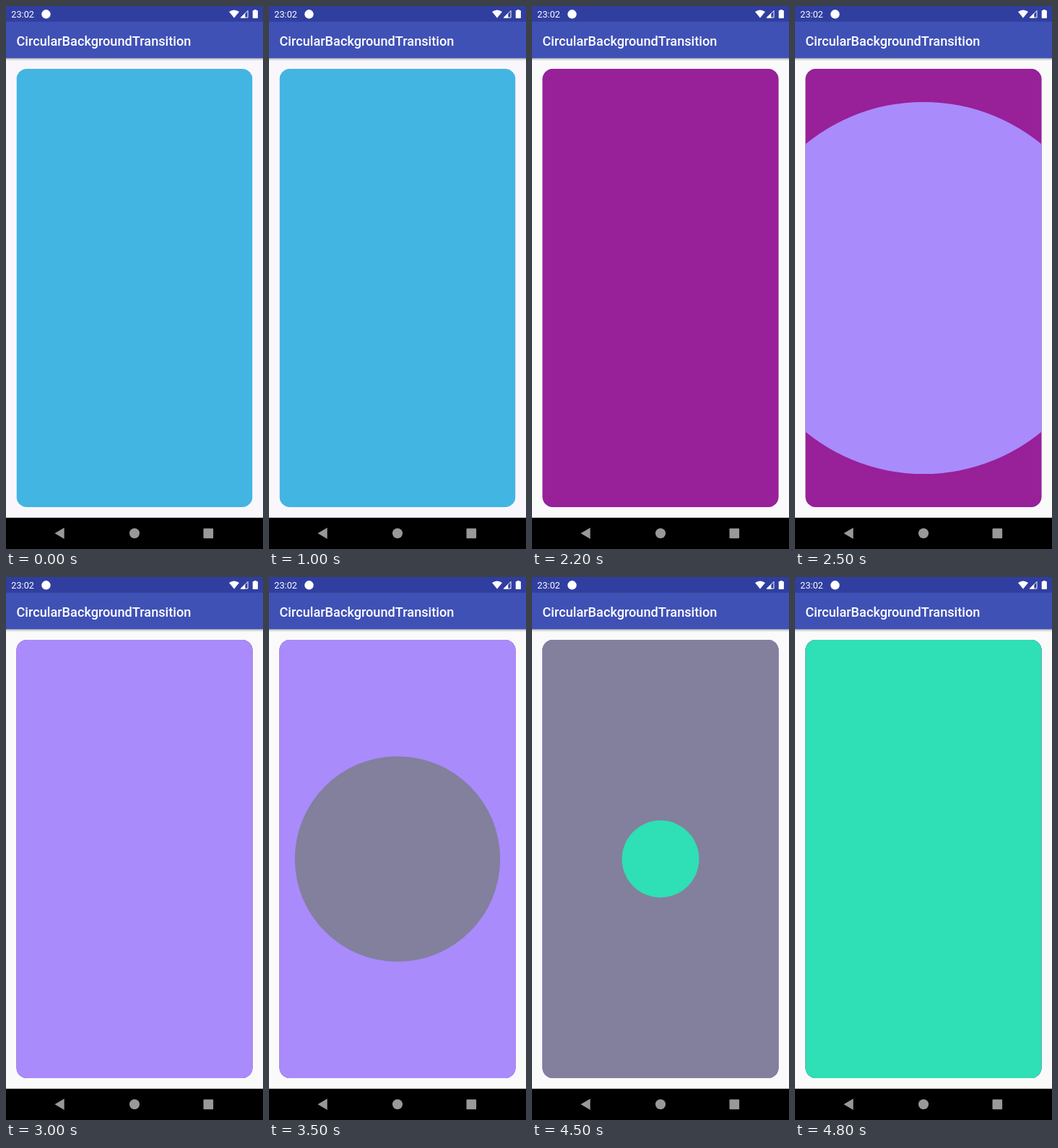
Animation of 356x752 px, one loop 4900 ms. Source, as an HTML page with a canvas:

```html
<!DOCTYPE html>
<html lang="en">
<head>
<meta charset="utf-8">
<title>Circular transition</title>
<style>
html, body { margin: 0; width: 100%; height: 100%; overflow: hidden; background: #fafafa; }
canvas { display: block; width: 356px; height: 752px; }
</style>
</head>
<body>
<canvas id="stage"></canvas>
<script>
const W = 356, H = 752, LOOP = 4900, STEP = 100;
const CARD = { x: 14.5, y: 87, w: 327, h: 607, r: 14.5 };
const BASE = '#43b5e2';
const GROW = 600;
const REVEALS = [
  { start: 1151, color: '#982099' },
  { start: 2229, color: '#a98bfc' },
  { start: 3307, color: '#82809d' },
  { start: 4385, color: '#2fdfb5' }
];

const canvas = document.getElementById('stage');
const ctx = canvas.getContext('2d');
const scale = window.devicePixelRatio || 1;
canvas.width = W * scale;
canvas.height = H * scale;

const ease = p => (1 - Math.cos(Math.PI * p)) / 2;

function rect(x, y, w, h, color) {
  ctx.fillStyle = color;
  ctx.fillRect(x, y, w, h);
}

function disc(x, y, r, color) {
  ctx.fillStyle = color;
  ctx.beginPath();
  ctx.arc(x, y, r, 0, Math.PI * 2);
  ctx.fill();
}

function polygon(points, color) {
  ctx.fillStyle = color;
  ctx.beginPath();
  points.forEach(([x, y]) => ctx.lineTo(x, y));
  ctx.closePath();
  ctx.fill();
}

function label(text, x, y, font) {
  ctx.fillStyle = '#fff';
  ctx.font = font;
  ctx.fillText(text, x, y);
}

function drawStatusIcons() {
  disc(55.5, 11.3, 6.2, '#fff');

  // Wi-Fi
  ctx.fillStyle = '#fff';
  ctx.beginPath();
  ctx.moveTo(316, 16.6);
  ctx.lineTo(309, 8);
  ctx.quadraticCurveTo(316, 3, 323, 8);
  ctx.closePath();
  ctx.fill();

  // Mobile signal
  polygon([[324.5, 16.5], [331.3, 9.7], [331.3, 16.5]], '#fff');
  ctx.strokeStyle = '#fff';
  ctx.lineWidth = 1;
  ctx.beginPath();
  ctx.moveTo(325.5, 16);
  ctx.lineTo(335, 6.5);
  ctx.lineTo(335, 16);
  ctx.closePath();
  ctx.stroke();

  // Battery
  rect(343.8, 5, 3, 2, '#fff');
  ctx.fillStyle = '#fff';
  ctx.beginPath();
  ctx.roundRect(341.7, 6, 7.2, 11, 0.8);
  ctx.fill();
}

function drawBars() {
  const shadow = ctx.createLinearGradient(0, 72, 0, 76);
  shadow.addColorStop(0, 'rgba(0,0,0,.28)');
  shadow.addColorStop(1, 'rgba(0,0,0,0)');
  rect(0, 72, W, 4, shadow);
  rect(0, 0, W, 72.3, '#3f51b5');
  rect(0, 0, W, 21.7, '#303f9f');
  label('23:02', 7.3, 16, '12.7px Roboto, sans-serif');
  label('CircularBackgroundTransition', 14.5, 54.5, '500 18.15px Roboto, sans-serif');
  drawStatusIcons();

  rect(0, 708.7, W, H - 708.7, '#000');
  polygon([[67.5, 730.3], [80.7, 722.6], [80.7, 738]], '#999');
  disc(178, 730.3, 7, '#999');
  ctx.fillStyle = '#999';
  ctx.beginPath();
  ctx.roundRect(273.5, 723.6, 13.6, 13.6, 1);
  ctx.fill();
}

function drawCard(t) {
  const { x, y, w, h, r } = CARD;
  ctx.save();
  ctx.beginPath();
  ctx.roundRect(x, y, w, h, r);
  ctx.clip();
  rect(x, y, w, h, BASE);
  for (const { start, color } of REVEALS) {
    if (t <= start) break;
    const p = Math.min(1, (t - start) / GROW);
    disc(x + w / 2, y + h / 2, h * ease(p), color);
  }
  ctx.restore();
}

function draw(t) {
  ctx.setTransform(scale, 0, 0, scale, 0, 0);
  rect(0, 0, W, H, t < 1500 ? '#faf7fc' : '#fafafa');
  drawCard(t);
  drawBars();
}

function tick() {
  const t = performance.now() % LOOP;
  draw(Math.floor(t / STEP) * STEP);
  requestAnimationFrame(tick);
}
tick();
</script>
</body>
</html>
```
